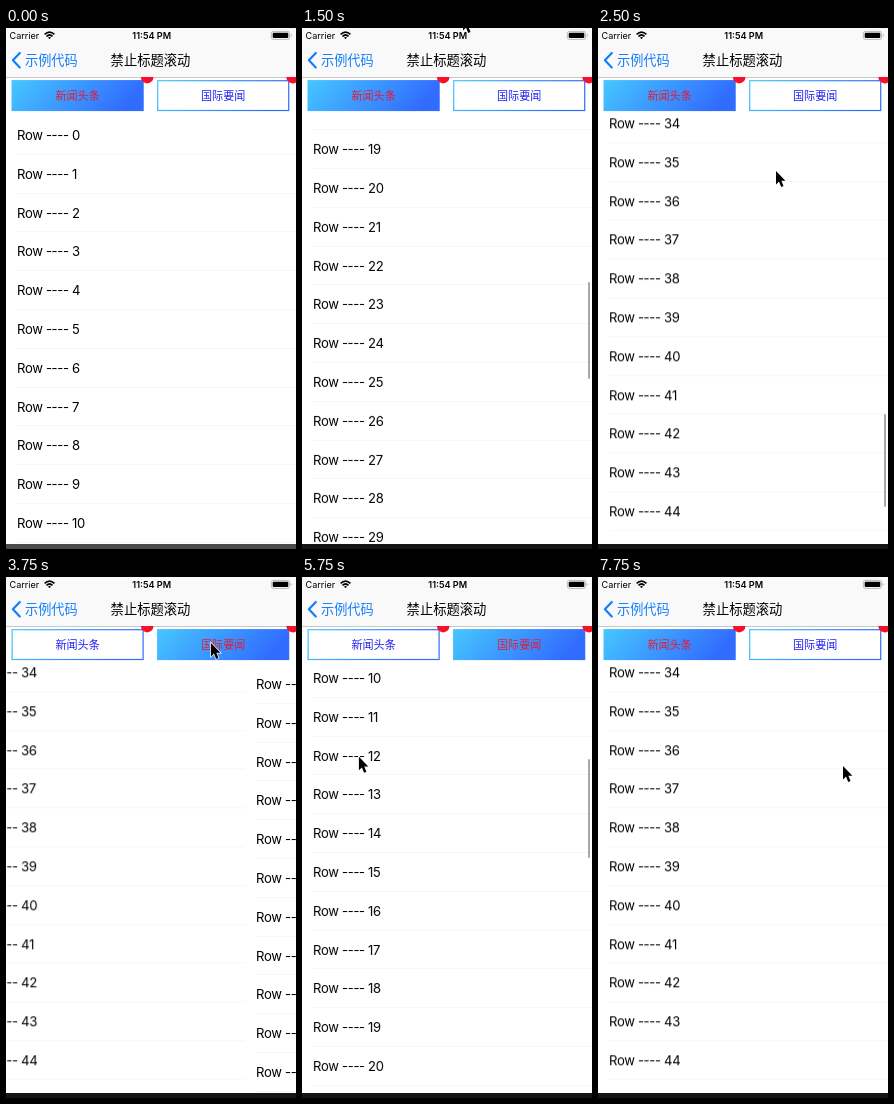
Animation, 290 px wide and 521 px high, one loop 8 s. Source, as an HTML page:

```html
<!DOCTYPE html>
<html lang="zh-CN">
<head>
<meta charset="utf-8">
<title>禁止标题滚动</title>
<style>
  html, body { margin: 0; width: 100%; height: 100%; overflow: hidden; background: #fff; }
  #stage { position: relative; width: 290px; height: 521px; overflow: hidden; background: #fff;
    font-family: Inter, "Noto Sans CJK SC", "Noto Sans CJK", "Noto Sans CJK JP", sans-serif; color: #000; }
  #stage > * { position: absolute; left: 0; top: 0; }
  #header { width: 290px; height: 49px; background: #f9f9fa; border-bottom: 1px solid #c8c8ca; }
  #stage > #view { top: 87px; width: 290px; height: 429px; overflow: hidden; }
  .page { position: absolute; left: 0; top: 0; width: 290px; height: 429px; overflow: hidden; background: #fff; }
  .list { position: absolute; left: 11px; top: .6px; width: 279px; will-change: transform; }
  .row { height: 38.8px; line-height: 38.8px; box-sizing: border-box; border-bottom: 1px solid #f6f6f7;
    font-size: 13.1px; letter-spacing: -.33px; white-space: pre; }
  .thumb { position: absolute; left: 286px; width: 2px; border-radius: 1px; background: #a8a8a8; }
  #stage > #bar { top: 516px; width: 290px; height: 5px; }
  .tab rect { fill: #fff; stroke: url(#blue); stroke-width: 1.2; }
  .tab text { fill: #2222f5; font-size: 11.1px; text-anchor: middle; }
  .tab.on rect { fill: url(#blue); }
  .tab.on text { fill: #e41c38; }
</style>
</head>
<body>
<div id="stage">
  <div id="view"></div>
  <div id="header"></div>
  <svg width="290" height="87">
    <defs>
      <linearGradient id="blue" x2="1" y2=".2">
        <stop stop-color="#46c6ff"/><stop offset="1" stop-color="#316cff"/>
      </linearGradient>
      <clipPath id="below"><rect y="49" width="290" height="38"/></clipPath>
    </defs>
    <text x="3.5" y="10.8" font-size="9.1">Carrier</text>
    <g fill="none" stroke="#000" stroke-width="1.7">
      <path d="M38.6 6.3Q43.5 1.8 48.4 6.3M40.5 8.4Q43.5 5.6 46.5 8.4"/>
      <path d="M42 9.6Q43.5 8.4 45 9.6L43.5 11.2Z" fill="#000" stroke="none"/>
    </g>
    <text x="145.7" y="10.9" font-size="9.1" font-weight="600" text-anchor="middle">11:54 PM</text>
    <rect x="265.4" y="3.4" width="18.2" height="8" rx="2" fill="none" stroke="#aaa" stroke-width=".8"/>
    <rect x="266.7" y="4.7" width="15.6" height="5.4" rx="1"/>
    <path d="M284.8 6Q286.8 7.4 284.8 8.8Z" fill="#aaa"/>
    <path d="M13.8 25L6.9 32.2L13.8 39.4" fill="none" stroke="#147efb" stroke-width="2.2" stroke-linecap="round" stroke-linejoin="round"/>
    <text x="19" y="37" font-size="13.2" fill="#147efb">示例代码</text>
    <text x="144.5" y="37" font-size="13.3" font-weight="500" text-anchor="middle">禁止标题滚动</text>
    <g class="tab"><rect x="6.1" y="52.7" width="131" height="29.8"/><text x="71.6" y="72">新闻头条</text></g>
    <g class="tab"><rect x="151.7" y="52.7" width="131" height="29.8"/><text x="217.2" y="72">国际要闻</text></g>
    <g fill="#f8102a" clip-path="url(#below)">
      <circle cx="141.2" cy="49.2" r="6.2"/><circle cx="286.6" cy="49.2" r="6.2"/>
    </g>
  </svg>
  <div id="bar"></div>
  <svg id="cursor" width="14" height="20" overflow="visible">
    <path d="M0 0V13.4L3 10.6L5.2 15.9L7.5 14.9L5.4 9.8H9.4Z" stroke="#fff" stroke-width="1.4" paint-order="stroke"/>
  </svg>
</div>
<script>
const DURATION = 8000, STEP = 250, PAGE_WIDTH = 290, ROWS = 45, VIEW_TOP = 87;
const $ = id => document.getElementById(id);
const tabs = document.querySelectorAll(".tab");

// Smooth progress from 0 to 1 between two times.
function glide(t, from, to) {
  const k = Math.min(1, Math.max(0, (t - from) / (to - from)));
  return k * k * (3 - 2 * k);
}

const lists = [
  { distance: 1330.7, from: 377, to: 2500, thumbFrom: 500, thumbTo: 3000 },
  { distance: 394, from: 4265, to: 5500, thumbFrom: 4500, thumbTo: 6000 }
];

const pointerStart = { x: 165, y: 530 };
const pointerMoves = [
  { from: 500, to: 1500, x: 161, y: -11 },
  { from: 1500, to: 2500, x: 178, y: 143 },
  { from: 2750, to: 3250, x: 205, y: 66 },
  { from: 3750, to: 4250, x: 190, y: 383 },
  { from: 4250, to: 5000, x: 186, y: 130 },
  { from: 5000, to: 6000, x: 33, y: 189 }
];

for (const list of lists) {
  list.page = document.createElement("div");
  list.page.className = "page";
  const rows = Array.from({ length: ROWS }, (_, i) => `<div class="row">Row ---- ${i}</div>`).join("");
  list.page.innerHTML = `<div class="list">${rows}</div><div class="thumb"></div>`;
  $("view").append(list.page);
}

function pointerAt(t, dragged) {
  const p = { ...pointerStart };
  for (const move of pointerMoves) {
    const k = glide(t, move.from, move.to);
    p.x += (move.x - p.x) * k;
    p.y += (move.y - p.y) * k;
  }
  p.x += Math.min(212, dragged);
  return p;
}

function draw(t) {
  const dragged = PAGE_WIDTH * glide(t, 6370, 7500);
  const offset = PAGE_WIDTH * glide(t, 3659, 4000) - dragged;

  lists.forEach(({ page, distance, from, to, thumbFrom, thumbTo }, i) => {
    const scroll = distance * glide(t, from, to);
    const [list, thumb] = page.children;
    page.style.transform = `translateX(${i * PAGE_WIDTH - offset}px)`;
    list.style.transform = `translateY(${-scroll}px)`;
    thumb.style.top = 97 + scroll * 0.217 - VIEW_TOP + "px";
    thumb.style.height = 101 - scroll * 0.006 + "px";
    thumb.style.display = t >= thumbFrom && t < thumbTo ? "block" : "none";
  });

  const active = t >= 3750 && t < 7500 ? 1 : 0;
  tabs.forEach((tab, i) => tab.classList.toggle("on", i === active));
  const { x, y } = pointerAt(t, dragged);
  $("cursor").style.transform = `translate(${x}px, ${y}px)`;
  $("bar").style.background = t < 500 ? "#4a4a4a" : "#151515";
}

function frame() {
  const t = performance.now() % DURATION;
  draw(Math.floor(t / STEP) * STEP);
  requestAnimationFrame(frame);
}
frame();
</script>
</body>
</html>
```
